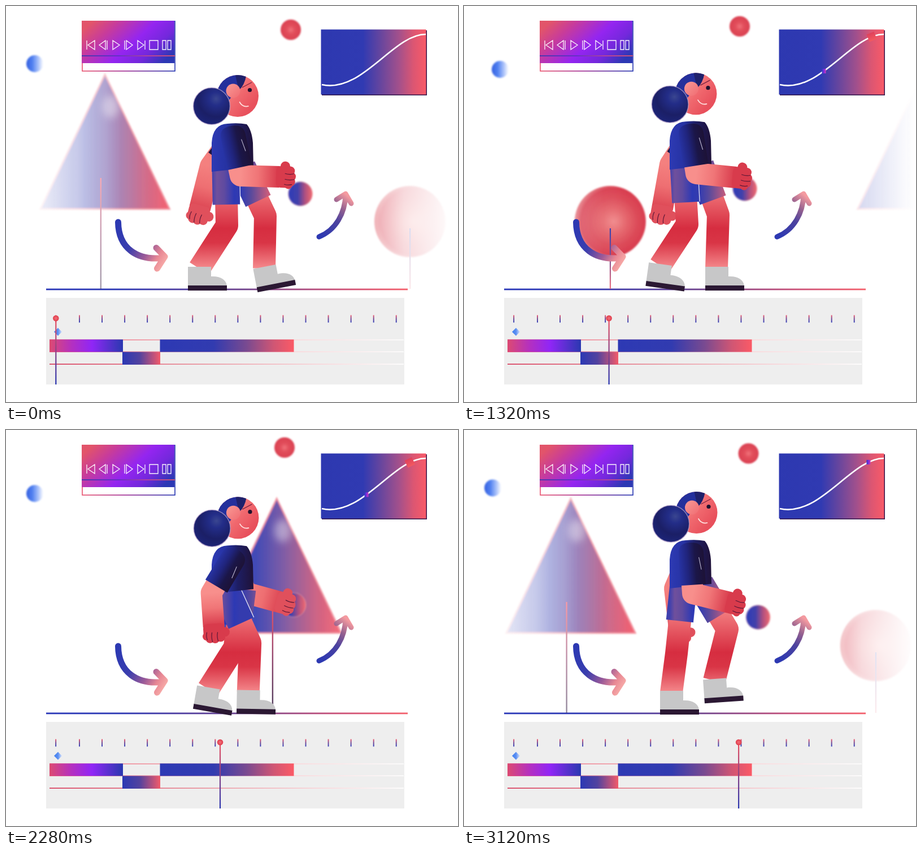
Write an HTML page that moves like this. It is 800 px wide and 700 px high and loops after 3.16 s.

```html
<!DOCTYPE html>
<html lang="en">
<head>
<meta charset="utf-8">
<title>Walk cycle</title>
<style>
  html, body { margin: 0; width: 100%; height: 100%; overflow: hidden; background: #fff; }
  svg { display: block; width: 800px; height: 700px; }
  .limb { fill: none; stroke-linejoin: round; }
  .arrow { fill: none; stroke-linecap: round; stroke-linejoin: round; }
  .crease { fill: none; stroke: #5c1838; stroke-width: 1.2; stroke-linecap: round; }
</style>
</head>
<body>
<svg viewBox="0 0 800 700" xmlns="http://www.w3.org/2000/svg">
  <defs id="defs">
    <filter id="soft" x="-20%" y="-20%" width="140%" height="140%"><feGaussianBlur stdDeviation="1.8"/></filter>
    <filter id="haze" x="-50%" y="-50%" width="200%" height="200%"><feGaussianBlur stdDeviation="7"/></filter>
    <filter id="edge" x="-5%" y="-10%" width="110%" height="120%"><feGaussianBlur stdDeviation=".7"/></filter>
    <mask id="fade" maskUnits="userSpaceOnUse" x="0" y="0" width="800" height="700">
      <rect width="800" height="700" fill="url(#fadeFill)"/>
    </mask>
    <clipPath id="faceClip"><circle cx="410" cy="159" r="37"/></clipPath>
    <g id="shoe">
      <path d="M-20 0H21V17C38 16 48 23 49 34H-20Z" fill="#c7c7c8"/>
      <rect x="-20" y="33" width="69" height="9" fill="#2b1833"/>
    </g>
    <g id="hand">
      <rect x="-6" y="-19" width="28" height="38" rx="8"/>
      <circle cx="10" cy="-19" r="8.500"/>
      <circle cx="19" cy="-11" r="8"/>
      <circle cx="21" cy="-1" r="8"/>
      <circle cx="20" cy="8" r="8"/>
      <circle cx="16" cy="14" r="7"/>
    </g>
    <path id="creases" class="crease" d="M10 -6Q18 -4 25 -6M10 4Q18 6 26 4M9 13Q16 15 22 13"/>
  </defs>

  <!-- playback panel -->
  <rect x="135" y="27" width="164" height="88" fill="#fff" stroke="url(#frame)" stroke-width="1.6"/>
  <rect x="134" y="26" width="164" height="75" fill="url(#player)" filter="url(#edge)"/>
  <rect x="134" y="87.300" width="165" height="1.600" fill="url(#divider)"/>
  <path fill="none" stroke="#fff" stroke-width="1.3" stroke-opacity=".95" d="M143 61V77M157 61V77L145 69ZM176 61V77L165 69ZM179 61V77M189 61V77L201 69ZM210 61V77M213 61V77L224 69ZM233 61V77L244 69ZM246 61V77M254 61H269V77H254ZM277 61h6v16h-6zM286 61h6v16h-6z"/>

  <!-- easing graph -->
  <rect x="559" y="43" width="186" height="115" fill="#33184d"/>
  <rect x="557.500" y="41.500" width="186" height="115" fill="url(#graph)" filter="url(#edge)"/>
  <path d="M559 139C630 155 685 50 743 50" fill="none" stroke="#fff" stroke-width="2.6"/>
  <g id="marks"></g>

  <rect x="71" y="499.500" width="640" height="2.800" fill="url(#ground)"/>

  <!-- passing trees -->
  <g mask="url(#fade)">
    <g id="pine">
      <path d="M7.500 121L122 359H-107Z" fill="url(#pineFill)" stroke="#f28b98" stroke-width="2.5" filter="url(#soft)" opacity=".92"/>
      <ellipse cx="18" cy="178" rx="15" ry="20" fill="#fff" opacity=".4" filter="url(#haze)"/>
      <rect x="-1" y="304" width="2.400" height="196" fill="url(#pinePole)"/>
    </g>
    <g id="round">
      <circle cx="0" cy="381" r="63" fill="url(#roundFill)" filter="url(#soft)"/>
      <rect x="-1" y="393" width="2.200" height="107" fill="url(#roundPole)"/>
    </g>
  </g>

  <path class="arrow" stroke="url(#arrowA)" stroke-width="11" d="M198.500 382C199 428 232 451 279 445M266 427.500L281 443L267.500 464"/>
  <path class="arrow" stroke="url(#arrowB)" stroke-width="9" d="M554 408C584 396 600 366 601 334M585 342L601 332L611 349"/>

  <!-- floating balls -->
  <circle id="ballBlue" r="15" fill="url(#blueFill)" filter="url(#soft)"/>
  <circle id="ballRed" r="18" fill="url(#redFill)" filter="url(#soft)"/>
  <circle id="ballHand" r="21.500" fill="url(#handFill)" stroke="#f4b4bc" stroke-opacity=".6" filter="url(#soft)"/>

  <!-- walker -->
  <g id="farArm"></g>
  <g id="farLeg"></g>
  <g id="nearLeg"></g>
  <path id="shirt" fill="url(#shirtFill)" d="M364 293V242Q366 209 392 208Q411 206 426 209Q435 219 437 242L438 285Z"/>
  <g id="nearArm"></g>
  <g id="head">
    <circle cx="410" cy="159" r="37" fill="url(#face)"/>
    <path d="M370 170V118H426Q423 140 412 149Q398 158 388 178Z" fill="#24309c" clip-path="url(#faceClip)"/>
    <path d="M405 118H426Q423 140 412 149Z" fill="#1d1a52" opacity=".65" clip-path="url(#faceClip)"/>
    <path d="M418 144L435 135" stroke="#7a2340" stroke-width="1.3"/>
    <circle id="eye" cx="431.500" cy="148.500" r="3.6" fill="#20122e"/>
    <path d="M413.500 170Q419 179.500 429 177" fill="none" stroke="#ffe4e2" stroke-width="1.7" stroke-linecap="round"/>
  </g>
  <circle id="bun" r="32.500" fill="url(#bunFill)" stroke="#b9a4cc" stroke-opacity=".7" stroke-width="1.600" filter="url(#edge)"/>
  <circle id="ear" r="12.500" fill="url(#earFill)"/>

  <!-- timeline -->
  <rect x="71" y="516" width="634" height="153" fill="#eee"/>
  <g id="ticks"></g>
  <path d="M85 576L92 569L99 576L92 583Z" fill="url(#keyFill)"/>
  <rect x="77" y="589.500" width="627" height="1.500" fill="url(#rail)"/>
  <rect x="77" y="610.500" width="627" height="1.500" fill="url(#rail)"/>
  <rect x="77" y="632.300" width="627" height="1.700" fill="url(#railStrong)"/>
  <g filter="url(#edge)">
    <rect x="77" y="589.500" width="130" height="22" fill="url(#clipA)"/>
    <rect x="206" y="611.500" width="67" height="22.500" fill="url(#clipB)"/>
    <rect x="272.500" y="589.500" width="237" height="22" fill="url(#clipC)"/>
  </g>
  <g id="playhead">
    <rect x="-1.100" y="552" width="2.200" height="117" fill="url(#headLine)"/>
    <circle cy="552" r="5.300" fill="url(#knob)"/>
  </g>
</svg>
<script>
const $ = id => document.getElementById(id);
const add = (parent, html) => parent.insertAdjacentHTML('beforeend', html);
const LOOP = 3160, STEP = 40, CYCLE = 640;

// ---- gradients: "offset color" pairs separated by commas ----
const stops = s => s.split(',').map(p => {
  const [at, color, alpha = 1] = p.trim().split(' ');
  return `<stop offset="${at}%" stop-color="${color}" stop-opacity="${alpha}"/>`;
}).join('');
const lin = (id, s, [x1, y1, x2, y2] = [0, 0, 1, 0], user = false) => add($('defs'),
  `<linearGradient id="${id}" x1="${x1}" y1="${y1}" x2="${x2}" y2="${y2}"` +
  `${user ? ' gradientUnits="userSpaceOnUse"' : ''}>${stops(s)}</linearGradient>`);
const rad = (id, s, cx = .5, cy = .5, r = .5) => add($('defs'),
  `<radialGradient id="${id}" cx="${cx}" cy="${cy}" r="${r}">${stops(s)}</radialGradient>`);
const down = [0, 0, 0, 1];

lin('fadeFill', '1 #fff 0,4 #fff .04,9 #fff .13,16 #fff .3,22 #fff .55,25.5 #fff .78,31 #fff .95,36 #fff,' +
  '70 #fff,76.5 #fff .88,80 #fff .6,83 #fff .38,88 #fff .2,93 #fff .11,97 #fff .04,100 #fff 0', [0, 0, 800, 0], true);
lin('frame', '0 #e8506c,45 #a02890,100 #2434b0');
lin('divider', '0 #2c38b4,40 #5a34b8,70 #c04890,100 #f0566a');
lin('player', '0 #e2546a,22 #c83c9a,55 #9425f0,78 #7428dc,100 #2c38b4', [0, .25, 1, .75]);
lin('graph', '0 #2d38b0,40 #303ab2,56 #64459f,74 #a2508c,88 #dc5672,100 #f95a68');
lin('ground', '0 #2a38b8,20 #2c38b4,55 #70428c,80 #c85078,100 #f4606c');
lin('pineFill', '0 #2c3ab4,33 #303ab0,55 #74509f,80 #c8587c,100 #f55464');
lin('pinePole', '0 #f0566a,50 #94486f,100 #4b3c5c', down);
lin('roundPole', '0 #2d3ab0,50 #7a4a8c,100 #ee6c7c', down);
rad('roundFill', '0 #f08a8c,30 #e66a70,65 #dc4a58,90 #d83c4e,100 #e0616c', .55, .5, .52);
lin('arrowA', '0 #2d39b2,35 #3a3eae,65 #9a5a98,85 #e88894,100 #f6a8a6', [196, 395, 284, 448], true);
lin('arrowB', '0 #2d39b2,45 #4c429f,72 #94608f,100 #f49aa0', [556, 405, 610, 340], true);
lin('blueFill', '0 #3560e0,35 #5080f0,70 #a8c0fa,100 #fff');
rad('redFill', '0 #f0727a,40 #e24f5c,100 #da3f50');
lin('handFill', '0 #2c3cb8,40 #4140aa,70 #b0507f,100 #f26a70');
lin('shirtFill', '0 #2d3ab4,35 #2632a2,62 #1e1e64,100 #1f1238', [364, 0, 438, 0], true);
lin('sleeveFill', '0 #2733a4,35 #20247c,65 #1b1648,100 #1d1236');
lin('shortsNear', '0 #3f40ae,18 #70509c,45 #5f4aa0,80 #2d39b4,100 #343bae', [364, 0, 414, 0], true);
lin('shortsFar', '0 #2d39b4,40 #5a4a9c,100 #c85c7c', [414, 0, 464, 0], true);
lin('skinLeg', '0 #f27b7e,50 #d62d40,68 #d93546,100 #f58a8d', [0, 322, 0, 464], true);
lin('skinNear', '0 #f88f8c,45 #f07577,100 #d7384a', [0, 0, 1, 0], true);
lin('skinFar', '0 #f4807f,50 #ee6f72,100 #dc4553', [0, 0, 1, 0], true);
lin('face', '0 #f68c8a,50 #f0686e,100 #e8505c', [.2, .3, .8, .8]);
lin('earFill', '0 #f99a96,100 #f06c72', [0, 0, 1, 1]);
rad('bunFill', '0 #3a4690,25 #232d88,65 #1b1f66,100 #1c2478', .62, .3, .75);
lin('keyFill', '0 #3f80f0,50 #5a8ef2,100 #d8e4fc');
lin('rail', '0 #f0607a,30 #f0909c,65 #fad0d4,100 #fff');
lin('railStrong', '0 #d83c5c,40 #e88c98,75 #f8d4d8,100 #fff');
lin('clipA', '0 #dc4a72,30 #b430c0,58 #9026f6,80 #5a30d0,100 #2a38b0');
lin('clipB', '0 #2b38b4,45 #51429f,100 #f25a6a');
lin('clipC', '0 #2d39b4,40 #313bb0,65 #7a4a90,85 #d05674,100 #fb5a66');
lin('headLine', '0 #f0505e,50 #8a4286,100 #2634b0', down);
rad('knob', '0 #f27078,100 #e03c4c');
lin('tick', '0 #f0566c,45 #7a4a90,100 #2a3ab8', down);
lin('violet', '0 #2c3cc8,55 #8a2ae0,100 #d040b0');
lin('rose', '0 #e0405a,100 #f25a60', down);

// the first tick sits under the playhead's start
for (let i = 0; i < 16; i++)
  add($('ticks'), `<rect x="${i ? 89 + i * 40.05 : 87.2}" y="546.500" width="1.900" height="13" fill="url(#tick)"/>`);

// ---- limbs ----
for (const side of ['near', 'far']) {
  const cap = side === 'near' ? 'Near' : 'Far';
  add($(side + 'Leg'), `<path class="limb" stroke="url(#skinLeg)" stroke-width="40"/>
    <path class="limb" stroke="url(#shorts${cap})" stroke-width="49"/>
    <use href="#shoe"/>` + (side === 'near' ? '<path stroke="#fff" stroke-width="1.3" stroke-opacity=".85"/>' : ''));
  add($(side + 'Arm'), `<path class="limb" stroke="url(#skin${cap})" stroke-width="38"/>
    <use href="#hand" fill="${side === 'near' ? '#d83b4c' : '#e0505c'}"/><use href="#creases"/>` +
    (side === 'near'
      ? `<g><path fill="url(#sleeveFill)" d="M-20 0Q-20 -18 0 -18Q23 -18 24 0V57H-21Z"/>
         <path d="M15 9L18 31" stroke="#c8c4dc" stroke-width="1"/></g>`
      : '<g><rect x="-17" width="34" height="48" fill="#1b1644"/></g>'));
}

// rows: phase, knee x/y, ankle x/y, foot angle
const legs = {
  near: [[0,391,388,342,461,0],[40,395,386,347,456,8],[120,415,372,375,438,28],[180,448,355,412,430,16],
         [240,463,354,441,440,-4],[290,458,368,450,460,-10],[330,444,371,438,461,0],[440,402,390,404,457,0],[560,376,395,367,461,0]],
  far: [[0,459,371,457,461,-11],[40,450,369,447,461,0],[120,420,390,423,460,-1],[230,398,392,388,461,0],
        [330,398,388,356,460,3],[380,412,380,364,450,16],[440,441,358,394,433,33],[500,460,351,424,430,16],[560,466,352,443,440,-4]]
};
// rows: phase, elbow x/y, wrist x/y
const arms = {
  near: [[0,415,300,484,302],[40,411,296,481,303],[120,397,281,453,313],[240,372,283,415,335],
         [330,364,288,366,350],[440,369,286,398,334],[560,405,289,470,305]],
  far: [[0,362,283,343,358],[40,365,280,351,358],[120,386,283,410,340],[240,412,286,462,318],
        [330,422,290,482,304],[440,425,280,474,313],[560,373,280,381,350]]
};
const hips = { near: 389, far: 418 };

// smooth periodic interpolation through the rows
function sample(rows, p) {
  const n = rows.length;
  let i = n - 1;
  while (rows[i][0] > p) i--;
  const row = k => rows[(k + n) % n];
  const time = k => row(k)[0] + Math.floor(k / n) * CYCLE;
  const [t0, t1, t2, t3] = [-1, 0, 1, 2].map(d => time(i + d));
  const h = t2 - t1, u = (p - t1) / h;
  return row(i).slice(1).map((b, j) => {
    const a = row(i - 1)[j + 1], c = row(i + 1)[j + 1], d = row(i + 2)[j + 1];
    const m1 = (c - a) / (t2 - t0) * h, m2 = (d - b) / (t3 - t1) * h;
    const u2 = u * u, u3 = u2 * u;
    return (2 * u3 - 3 * u2 + 1) * b + (u3 - 2 * u2 + u) * m1 + (3 * u2 - 2 * u3) * c + (u3 - u2) * m2;
  });
}

// straight moves between rows of time, x, y
function along(rows, t) {
  const i = rows.findIndex(r => r[0] > t);
  const [a, b] = [rows[i - 1], rows[i]];
  const u = (t - a[0]) / (b[0] - a[0]);
  return [a[1] + (b[1] - a[1]) * u, a[2] + (b[2] - a[2]) * u];
}
const floats = {
  ballBlue: [[0,51,102],[917,72,109.5],[1320,64,112],[1960,51,116],[3160,51,102]],
  ballRed: [[0,504,42],[760,491,42],[1080,487,42],[1320,488,36],[1680,489,28],[1960,489,27],[3160,504,42]],
  ballHand: [[0,521,332],[440,507,331],[900,489,331],[1320,497,323],[1960,505,301],[3160,521,332]]
};

const move = (el, x, y, deg = 0) => el.setAttribute('transform', `translate(${x} ${y}) rotate(${deg})`);
const degrees = (dx, dy) => Math.atan2(dy, dx) * 180 / Math.PI;

function poseLeg(side, p, dy) {
  const [kx, ky, ax, ay, deg] = sample(legs[side], p);
  const [skin, shorts, shoe, seam] = $(side + 'Leg').children;
  const hx = hips[side], hy = 285 + dy;
  const len = Math.hypot(kx - hx, ky - hy), ux = (kx - hx) / len, uy = (ky - hy) / len;
  const ex = hx + ux * 66, ey = hy + uy * 66;
  skin.setAttribute('d', `M${hx} ${hy}L${kx} ${ky}L${ax} ${ay + 3}`);
  shorts.setAttribute('d', `M${hx} ${hy}L${ex} ${ey}`);
  move(shoe, ax, ay, deg);
  if (seam) seam.setAttribute('d', `M${hx + uy * 24.5} ${hy - ux * 24.5}L${ex + uy * 24.5} ${ey - ux * 24.5}`);
}

function poseArm(side, p, dy) {
  const [ex, ey, wx, wy] = sample(arms[side], p);
  const [skin, hand, creases, sleeve] = $(side + 'Arm').children;
  const sx = 400, sy = 230 + dy, turn = degrees(wx - ex, wy - ey);
  skin.setAttribute('d', `M${sx} ${sy}L${ex} ${ey}L${wx} ${wy}`);
  move(hand, wx, wy, turn);
  move(creases, wx, wy, turn);
  move(sleeve, sx, sy, degrees(ex - sx, ey - sy) - 90);
  const g = $(side === 'near' ? 'skinNear' : 'skinFar');
  Object.entries({ x1: ex, y1: ey, x2: wx, y2: wy }).forEach(([k, v]) => g.setAttribute(k, v));
}

// ---- markers riding the easing curve ----
const bez = (a, b, c, d, u) => {
  const v = 1 - u;
  return v * v * v * a + 3 * v * v * u * b + 3 * v * u * u * c + u * u * u * d;
};
const curveX = u => bez(559, 630, 685, 743, u);
const curveY = u => bez(139, 155, 50, 50, u);
function onCurve(x) {
  let lo = 0, hi = 1;
  for (let i = 0; i < 20; i++) {
    const mid = (lo + hi) / 2;
    if (curveX(mid) < x) lo = mid; else hi = mid;
  }
  const e = .01;
  return [curveY(lo), degrees(curveX(lo + e) - curveX(lo - e), curveY(lo + e) - curveY(lo - e))];
}
const marks = [
  ...[130, 925, 1880, 2330].map(start => ({ start, speed: .2, end: 724, ramp: 30, w: 7, h: 8, fill: 'violet' })),
  ...[485, 1480].map(start => ({ start, speed: .196, end: 741, ramp: 12, w: 14, h: 14, fill: 'rose', spin: true }))
];
for (const m of marks) {
  add($('marks'), `<rect x="${-m.w / 2}" y="${-m.h / 2}" width="${m.w}" height="${m.h}" fill="url(#${m.fill})"/>`);
  m.el = $('marks').lastElementChild;
}

const SPAN = 1092;
const treeX = (x0, t) => ((x0 - SPAN * t / LOOP + 200 + SPAN) % SPAN) - 200;

function draw(t) {
  const p = t % CYCLE;
  const lift = (1 - Math.cos(p / 320 * 2 * Math.PI)) / 2, dy = -26 * lift;

  move($('playhead'), 88.3 + t * .1275, 0);
  move($('pine'), treeX(167.6, t), 0);
  move($('round'), treeX(715, t), 0);
  for (const id in floats) move($(id), ...along(floats[id], t));

  for (const m of marks) {
    const x = 558 + m.speed * (t - m.start);
    const alpha = Math.max(0, Math.min(1, (x - 558) / m.ramp, (m.end - x) / 6));
    m.el.setAttribute('opacity', alpha);
    if (!alpha) continue;
    const [y, deg] = onCurve(x);
    move(m.el, x, y, m.spin ? deg : 0);
  }

  for (const side of ['far', 'near']) {
    poseLeg(side, p, dy);
    poseArm(side, p, dy);
  }
  move($('shirt'), 0, dy);
  move($('head'), 3 * lift, dy);
  move($('ear'), 402 + 3 * lift, 150 + dy);
  move($('bun'), 364 + 4.5 * lift, 177 + dy * .87);
  $('eye').setAttribute('r', Math.abs(t - 760) <= 40 ? 2 : 3.6);
}

const begin = performance.now();
function tick() {
  const t = (performance.now() - begin) % LOOP;
  draw(Math.floor(t / STEP) * STEP);
  requestAnimationFrame(tick);
}
draw(0);
requestAnimationFrame(tick);
</script>
</body>
</html>
```
